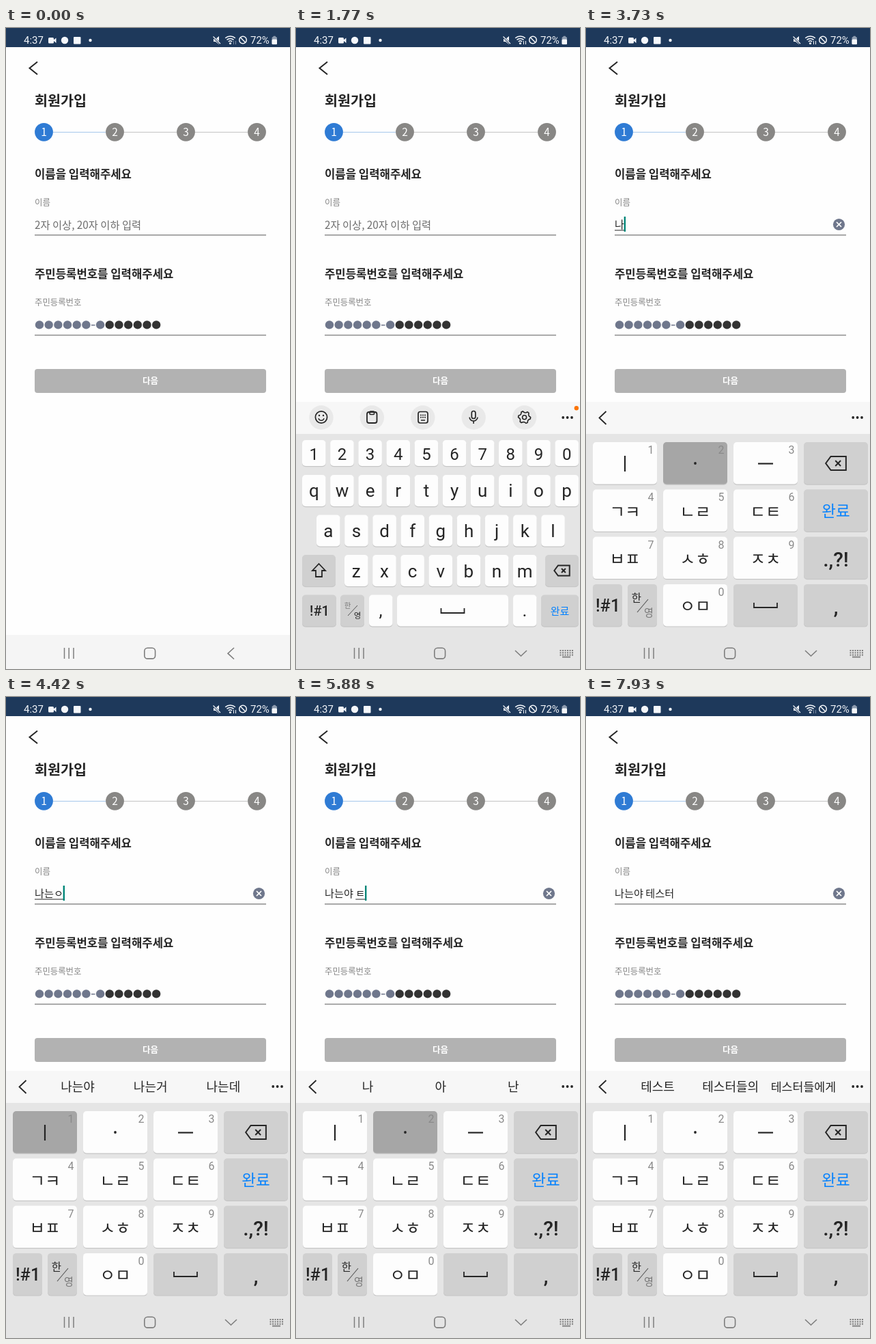
An HTML page with a canvas that plays this animation: 416 by 938 pixels, repeating every 8000 ms.

```html
<!DOCTYPE html>
<html lang="ko">
<head>
<meta charset="utf-8">
<title>회원가입</title>
<style>
html, body { margin: 0; width: 100%; height: 100%; overflow: hidden; background: #fefefe; }
canvas { display: block; width: 416px; height: 938px; }
</style>
</head>
<body>
<canvas id="stage"></canvas>
<script>
const W = 416, H = 938, LOOP = 8000;
const KO = '"Noto Sans CJK KR", "Noto Sans CJK JP", "Noto Sans CJK", sans-serif';
const LATIN = 'Roboto, sans-serif';
const INK = '#252525', SLATE = '#6f778c', BLUE = '#0381fe';
const canvas = document.getElementById('stage');
const c = canvas.getContext('2d');
const dpr = window.devicePixelRatio || 1;
canvas.width = W * dpr;
canvas.height = H * dpr;

// Last value of a [time, value] list that has been reached
const at = (list, t) => list.reduce((v, [time, next]) => t >= time ? next : v, '');

const typed = [
  [3350, 'ㄴ'], [3540, '니'], [3730, '나'], [3930, '난'], [4030, '나느'],
  [4220, '나는'], [4320, '나는ㅇ'], [4520, '나는이'], [4710, '나는아'],
  [4900, '나는야'], [5390, '나는야 '], [5590, '나는야 ㄷ'], [5780, '나는야 ㅌ'],
  [5980, '나는야 ㅌㆍ'], [6180, '나는야 터'], [6370, '나는야 테'],
  [6570, '나는야 텟'], [6770, '나는야 테스'], [6970, '나는야 테슫'],
  [7160, '나는야 테슽'], [7260, '나는야 테스ㅌㆍ'], [7450, '나는야 테스터']
];
const presses = [
  [3250, 'ㄴㄹ'], [3440, 'ㅣ'], [3640, 'ㆍ'], [3830, 'ㄴㄹ'], [3930, 'ㅡ'],
  [4120, 'ㄴㄹ'], [4220, 'ㅇㅁ'], [4420, 'ㅣ'], [4610, 'ㆍ'], [4810, 'ㆍ'],
  [5100, 'space'], [5290, 'space'], [5490, 'ㄷㅌ'], [5680, 'ㄷㅌ'], [5880, 'ㆍ'],
  [6080, 'ㅣ'], [6280, 'ㅣ'], [6470, 'ㅅㅎ'], [6680, 'ㅡ'], [6870, 'ㄷㅌ'],
  [7060, 'ㄷㅌ'], [7160, 'ㆍ'], [7350, 'ㅣ']
];
const suggestions = [
  [4320, '나는야|나는거|나는데'], [5200, '나|아|난'],
  [6870, '테스트|구름별|소 나루'], [7650, '테스트|테스터들의|테스터들에게']
];

function text(s, x, y, size, color, { font = LATIN, weight = 400, align = 'center' } = {}) {
  c.font = `${weight} ${size}px ${font}`;
  c.textAlign = align;
  c.fillStyle = color;
  c.fillText(s, x, y);
}
// Hangul placed by its vertical centre
function hangul(s, x, cy, size, color, weight = 400, align = 'left') {
  text(s, x, cy + size * 0.38, size, color, { font: KO, weight, align });
}
function box(x, y, w, h, r, color) {
  c.beginPath();
  c.roundRect(x, y, w, h, r);
  c.fillStyle = color;
  c.fill();
}
function frame(x, y, w, h, r, color, width) {
  c.beginPath();
  c.roundRect(x, y, w, h, r);
  c.strokeStyle = color;
  c.lineWidth = width;
  c.stroke();
}
function disc(x, y, r, color) {
  c.beginPath();
  c.arc(x, y, r, 0, 7);
  c.fillStyle = color;
  c.fill();
}
function ring(x, y, r, color, width, from = 0, to = 2 * Math.PI) {
  c.beginPath();
  c.arc(x, y, r, from, to);
  c.strokeStyle = color;
  c.lineWidth = width;
  c.stroke();
}
function line(points, color, width, close) {
  c.beginPath();
  for (let i = 0; i < points.length; i += 2) c.lineTo(points[i], points[i + 1]);
  if (close) c.closePath();
  c.strokeStyle = color;
  c.lineWidth = width;
  c.stroke();
}
function shape(points, color) {
  c.beginPath();
  for (let i = 0; i < points.length; i += 2) c.lineTo(points[i], points[i + 1]);
  c.fillStyle = color;
  c.fill();
}

function statusBar(t) {
  const white = '#f4f7fb';
  c.fillStyle = '#1e395b';
  c.fillRect(0, 0, W, 28);
  text('4:37', 26, 23, 15, white, { align: 'left' });
  box(62, 14, 8, 8.5, 1.5, white);
  shape([69, 18, 73.5, 14.5, 73.5, 22], white);
  disc(86, 18, 5.2, white);
  box(99, 13, 10.5, 10.5, 1, white);
  disc(123.5, 18, 2.2, white);

  shape([304, 16, 307, 16, 312, 12, 312, 24, 307, 20, 304, 20], white);
  line([303, 12, 314, 23.5], '#1e395b', 3);
  line([303.5, 12.5, 314, 23], white, 1.3);
  for (const r of [4, 7.5, 11]) ring(328.5, 23, r, white, 1.5, -2.3, -0.84);
  disc(328.5, 22.5, 1.6, white);
  const arrows = t >= 300 && t < 6280 ? white : '#7c8da4';
  line([333.5, 19, 333.5, 24], arrows, 1);
  line([336.5, 19, 336.5, 24], arrows, 1);
  ring(347, 17.5, 5.3, white, 1.5);
  line([343.3, 13.8, 350.7, 21.2], white, 1.5);
  text('72%', 358, 23, 15, white, { align: 'left' });
  box(389.5, 13, 7.5, 11, 1.5, '#8d9bae');
  box(391.5, 11.8, 3.5, 2, 0.5, '#8d9bae');
  box(389.5, 16.5, 7.5, 7.5, 1.5, white);
}

function nameField(t) {
  const value = at(typed, t), x = 42;
  if (value) {
    hangul(value, x, 287.5, 15.2, INK);
    const end = x + c.measureText(value).width;
    const start = x + c.measureText(value.slice(0, value.lastIndexOf(' ') + 1)).width;
    const composing = t < 7650 && !(t >= 5200 && t < 5590);
    if (composing) line([start, 296, end, 296], INK, 1);
    disc(370.5, 287.5, 8.6, SLATE);
    line([367, 284, 374, 291], '#fff', 1.7);
    line([374, 284, 367, 291], '#fff', 1.7);
    if (t < 7930) box(end - 0.3, 276, 2.4, 22, 0, '#008577');
  } else {
    hangul('2자 이상, 20자 이하 입력', x, 288, 15.3, '#6c6c6c');
    const blink = Math.floor((t - 287) / 492) % 2 === 0;
    if (t >= 300 && blink) box(x, 276, 2.4, 22, 0, '#008577');
  }
  line([42, 303, 381, 303], '#8c8c8c', 1.3);
}

function page(t) {
  c.fillStyle = '#fefefe';
  c.fillRect(0, 0, W, H);
  line([46, 49.5, 34.5, 58.7, 46, 68], INK, 2);
  hangul('회원가입', 42, 106, 20.7, INK, 700);
  line([69, 152.5, 146, 152.5], '#a5c7eb', 1.2);
  line([172, 152.5, 250, 152.5], '#c4c4c4', 1.2);
  line([276, 152.5, 354, 152.5], '#c4c4c4', 1.2);
  for (let i = 0; i < 4; i++) {
    const x = 55.5 + i * 104;
    disc(x, 152.3, 13.4, i ? '#888785' : '#2f7bd4');
    text(i + 1, x, 157.9, 15.5, '#fff', { font: KO, weight: 500 });
  }
  hangul('이름을 입력해주세요', 42, 213.5, 16.7, INK, 700);
  hangul('이름', 42, 255.3, 12.5, '#858585');
  nameField(t);
  hangul('주민등록번호를 입력해주세요', 42, 360, 16.7, INK, 700);
  hangul('주민등록번호', 42, 401.5, 12.4, '#858585');
  for (let i = 0; i < 13; i++) {
    const x = 49 + i * 13.68 + (i > 5 ? 7 : 0);
    disc(x, 434.4, 6.2, i < 7 ? SLATE : '#333');
  }
  line([125, 434.8, 130.5, 434.8], SLATE, 1.5);
  line([42, 449.5, 381, 449.5], '#8c8c8c', 1.3);
  box(42, 499, 339, 35, 4, '#b2b2b2');
  hangul('다음', 211.5, 516, 12.5, '#fff', 700, 'center');
}

function key(x, y, w, h, kind, pressed) {
  box(x, y + 1.2, w, h, 5, '#c6c6c6');
  box(x, y, w, h, 5, pressed ? '#a6a6a6' : kind === 'fn' ? '#d0d0d0' : '#fdfdfd');
}
function backspace(x, y, k) {
  line([-14, 0, -7, -9.5, 14, -9.5, 14, 9.5, -7, 9.5].map((v, i) => v * k + (i % 2 ? y : x)), INK, 2, true);
  const d = 3.7 * k, cx = x + 3 * k;
  line([cx - d, y - d, cx + d, y + d], INK, 2);
  line([cx + d, y - d, cx - d, y + d], INK, 2);
}
const spaceMark = (x, y) => line([x - 17, y - 4, x - 17, y + 3, x + 17, y + 3, x + 17, y - 4], INK, 1.8);

function toolIcons() {
  for (let i = 0; i < 5; i++) disc(37 + i * 74.4, 570, 17.7, '#e9e9e9');
  ring(37, 569.5, 8.6, INK, 1.7);
  disc(34, 567, 1.2, INK);
  disc(40, 567, 1.2, INK);
  ring(37, 570, 4.3, INK, 1.5, 0.3, 2.85);
  frame(104, 562, 14.5, 16, 3, INK, 1.8);
  frame(108, 561, 6.5, 4.5, 1, INK, 1.6);
  frame(179, 561.5, 14, 16.5, 3, INK, 1.7);
  for (let i = 0; i < 6; i++) disc(183 + i % 3 * 3, 566.5 + Math.floor(i / 3) * 3.2, 1, INK);
  line([183, 574, 189, 574], INK, 1.5);
  frame(257.3, 560.5, 5.6, 11, 2.8, INK, 1.7);
  ring(260.1, 569, 6, INK, 1.6, 0.1, 3.04);
  line([260.1, 575, 260.1, 579], INK, 1.6);
  c.beginPath();
  for (let i = 0; i < 24; i++) {
    const a = i * Math.PI / 12, r = i % 4 < 2 ? 9 : 7;
    c.lineTo(334.6 + r * Math.cos(a), 569.7 + r * Math.sin(a));
  }
  c.closePath();
  c.lineWidth = 1.6;
  c.strokeStyle = INK;
  c.stroke();
  ring(334.6, 569.7, 3, INK, 1.6);
}

function toolbar(t) {
  c.fillStyle = '#f7f7f7';
  c.fillRect(0, 547, W, 47);
  for (const x of [391.2, 397.6, 404]) disc(x, 570, 1.9, INK);
  if (t < 3350) {
    toolIcons();
    if (t < 2460) disc(410.8, 556.2, 3.2, '#fc7404');
    return;
  }
  line([29.5, 561, 19.5, 570.5, 29.5, 580], INK, 1.8);
  at(suggestions, t).split('|').forEach((word, i) =>
    hangul(word, 105 + i * 106.7, 570, word.length > 5 ? 17.3 : 18, INK, 400, 'center'));
}

function qwerty(t) {
  const rows = [
    ['1234567890', 9, 603, 38, 632], ['qwertyuiop', 9, 654, 46, 686],
    ['asdfghjkl', 30, 712.5, 46, 745], ['zxcvbnm', 71, 771, 46, 804]
  ];
  for (const [letters, x0, y, h, base] of rows) {
    [...letters].forEach((ch, i) => {
      const x = x0 + i * 41.15;
      key(x, y, 34.6, h);
      text(ch, x + 17.3, base, h < 40 ? 24 : 26, INK);
    });
  }
  key(9, 771, 49, 46, 'fn');
  line([33.5, 784, 43, 794, 38, 794, 38, 803, 29, 803, 29, 794, 24, 794], INK, 1.8, true);
  key(365, 771, 49, 46, 'fn');
  backspace(389.5, 794, 0.8);
  key(9, 829.5, 50, 46, 'fn');
  text('!#1', 34.5, 860, 20, INK, { weight: 500 });
  key(65, 829.5, 35, 46, 'fn', t >= 2460);
  hangul('한', 75.5, 845, 10.5, '#777', 400, 'center');
  line([76, 860, 90, 845], '#555', 1);
  hangul('영', 90, 860, 11.5, INK, 500, 'center');
  key(107, 829.5, 34.5, 46);
  text(',', 124, 861, 26, INK);
  key(148, 829.5, 163, 46);
  spaceMark(229.5, 853);
  key(318, 829.5, 34.5, 46);
  text('.', 335, 861, 26, INK);
  key(359, 829.5, 55, 46, 'fn');
  hangul('완료', 386.5, 853, 15, BLUE, 500, 'center');
}

function cheonjiin(t) {
  const down = presses.find(([time]) => t >= time && t < time + 95);
  const held = down ? down[1] : '';
  const col = i => 10 + i * 103, row = i => 606 + i * 69.3;
  const keys = ['ㅣ', 'ㆍ', 'ㅡ', 'ㄱㅋ', 'ㄴㄹ', 'ㄷㅌ', 'ㅂㅍ', 'ㅅㅎ', 'ㅈㅊ', '', 'ㅇㅁ'];
  keys.forEach((label, i) => {
    if (!label) return;
    const x = col(i % 3), y = row(Math.floor(i / 3)), cx = x + 47, cy = y + 31;
    key(x, y, 94, 61.5, '', held === label);
    text((i + 1) % 11, x + 85, y + 17, 16, '#8a8a8a');
    if (i === 0) line([cx, cy - 11, cx, cy + 12], INK, 2.2);
    else if (i === 1) disc(cx, cy, 1.9, INK);
    else if (i === 2) line([cx - 11, cy + 0.5, cx + 11, cy + 0.5], INK, 2.2);
    else hangul(label, cx, cy + 1, 24.5, INK, 500, 'center');
  });
  // hint on the last consonant key
  box(190, 817, 14, 16, 0, held === 'ㅇㅁ' ? '#a6a6a6' : '#fdfdfd');
  text('0', 198, 831, 16, '#8a8a8a');
  for (let i = 0; i < 4; i++) key(319, row(i), 94, 61.5, 'fn');
  backspace(366, 637, 1.06);
  hangul('완료', 366, 706.5, 22.5, BLUE, 500, 'center');
  text('.,?!', 366, 787.5, 30, INK, { weight: 500 });
  text(',', 366, 857, 30, INK, { weight: 500 });
  key(10, row(3), 43, 61.5, 'fn');
  text('!#1', 32, 854, 25, INK, { weight: 500 });
  key(61, row(3), 43, 61.5, 'fn');
  hangul('한', 74, 834, 15.5, INK, 500, 'center');
  line([75, 855, 91, 836], '#555', 1.1);
  hangul('영', 92, 855, 15, '#777', 400, 'center');
  key(216, row(3), 94, 61.5, 'fn', held === 'space');
  spaceMark(263, 845);
}

function keyboard(t) {
  // The panel rises in a few discrete, decelerating steps
  const step = Math.min(3, Math.floor((t - 300) / 95));
  const rest = 1 - (step * 97 + 50) / 341;
  c.save();
  c.translate(0, step < 3 ? 341 * rest * rest : 0);
  c.fillStyle = '#e5e5e5';
  c.fillRect(0, 547, W, 391);
  toolbar(t);
  if (t < 2560) qwerty(t); else cheonjiin(t);
  c.restore();
}

function navBar(t) {
  const open = t >= 300, gray = '#7d7d7d';
  c.fillStyle = open ? '#e5e5e5' : '#f5f5f5';
  c.fillRect(0, 888, W, 50);
  for (const x of [85.5, 92.2, 99]) line([x, 907, x, 923], gray, 1.5);
  frame(202.8, 907.3, 15.8, 15.6, 4.5, gray, 1.6);
  if (!open) {
    line([334, 907, 325, 915.2, 334, 923.5], gray, 1.6);
    return;
  }
  line([321, 911, 329.5, 919, 338, 911], gray, 1.6);
  for (let r = 0; r < 3; r++)
    for (let i = 0; i < 6; i++) box(386.5 + i * 3.5, 910 + r * 3.3, 2, 2, 0, gray);
  line([390, 920.5, 402, 920.5], gray, 1.8);
}

function draw(now) {
  const t = now % LOOP;
  c.setTransform(dpr, 0, 0, dpr, 0, 0);
  page(t);
  if (t >= 300) keyboard(t);
  navBar(t);
  statusBar(t);
  requestAnimationFrame(draw);
}
requestAnimationFrame(draw);
</script>
</body>
</html>
```
